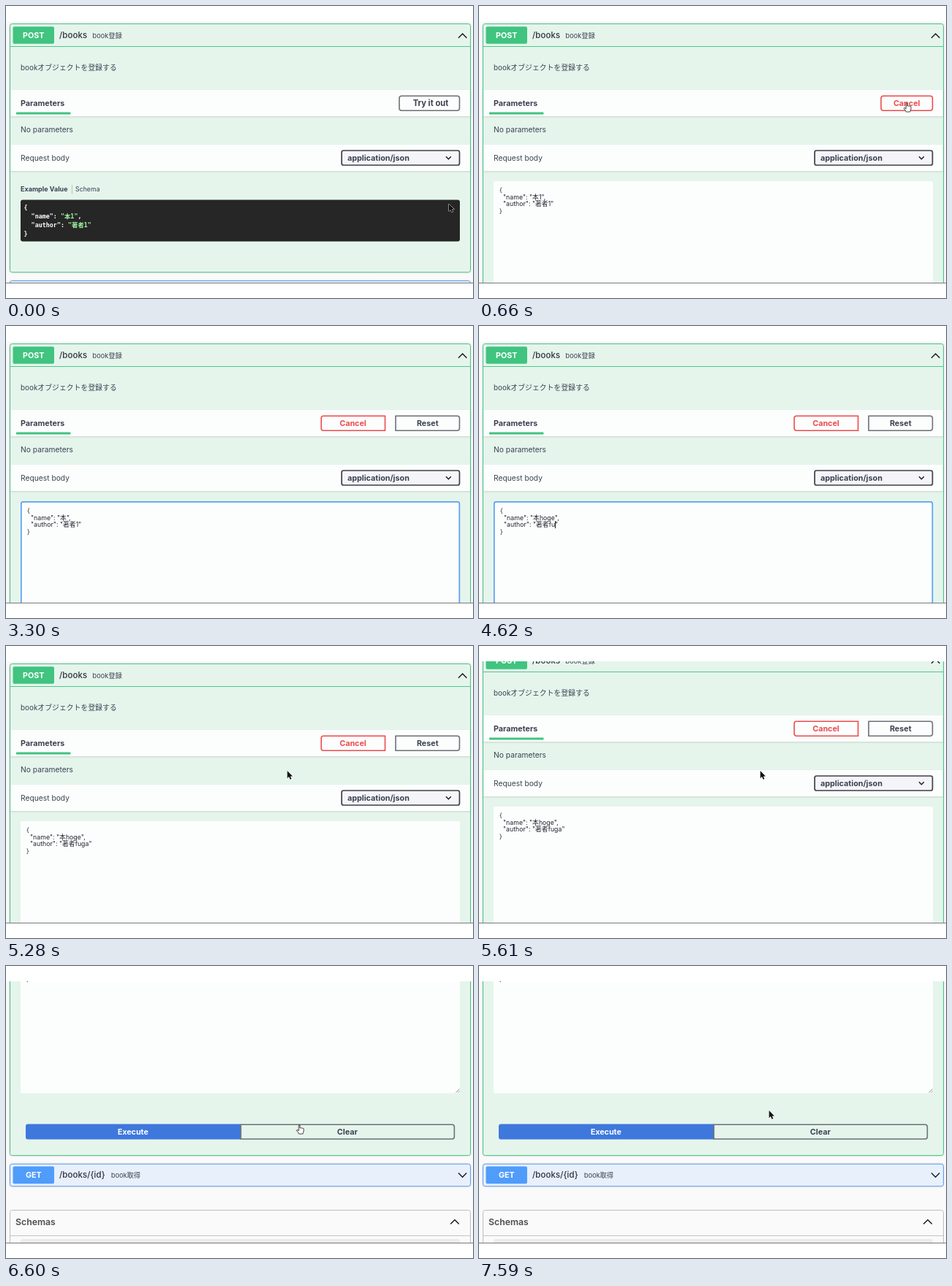
An HTML page that plays this animation: 640 by 400 pixels, repeating every 7.92 s.

```html
<!DOCTYPE html>
<html lang="ja">
<head>
<meta charset="utf-8">
<title>POST /books</title>
<style>
  html, body { margin: 0; width: 100%; height: 100%; overflow: hidden; background: #fff; }
  svg { display: block; width: 640px; height: 400px; }
  text { font: 10.25px Inter, "Noto Sans CJK JP", sans-serif; fill: #3b4151; white-space: pre; }
  .b { font-weight: 700; font-size: 10.75px; }
  .mid { text-anchor: middle; }
  .white { fill: #fff; }
  .path { font-size: 11.6px; font-weight: 500; fill: #30343f; }
  .note { font-size: 9.25px; }
  .code { font: 700 8.4px "DejaVu Sans Mono", "Noto Sans CJK JP", monospace; fill: #fff; }
  .code .str { fill: #a2f5a2; }
  #editor text { font-size: 8.8px; fill: #222630; }
  .row { fill: #fcfefd; filter: drop-shadow(0 1px 1px rgba(0,0,0,.13)); }
  .btn { fill: none; stroke: #6c6f75; stroke-width: 1.6; }
  .red { stroke: #ee4a4e; }
  text.red { stroke: none; fill: #ee4a4e; }
  .chev { fill: none; stroke: #16181c; stroke-width: 1.4; }
  .box { filter: drop-shadow(0 0 1.2px rgba(0,0,0,.2)); }
  .halo { stroke: #fff; stroke-width: .9; stroke-linejoin: round; paint-order: stroke; }
</style>
</head>
<body>
<svg viewBox="0 0 640 400">
  <clipPath id="view"><rect y="21" width="640" height="359"/></clipPath>
  <rect width="640" height="400" fill="#fff"/>
  <g clip-path="url(#view)">
    <rect y="21" width="640" height="359" fill="#fafafa"/>
    <g id="page">
      <rect id="panel" class="box" x="5.5" y="24.5" width="631" rx="3" fill="#e5f5ec" stroke="#4cc68a"/>
      <path d="M6 55.5H636" stroke="#4cc68a"/>
      <rect x="9.5" y="28.3" width="56.5" height="23.5" rx="2" fill="#40c47f"/>
      <text class="b mid white" x="37.8" y="43.9">POST</text>
      <text class="path" x="73" y="44.4">/books</text>
      <text class="note" x="118.6" y="43.6">book登録</text>
      <path class="chev" d="M620 43.8l5.7-5.8 5.7 5.8"/>
      <text x="20" y="87.6" style="font-size:9.9px">bookオブジェクトを登録する</text>

      <rect class="row" x="6" y="115" width="630" height="36"/>
      <text class="b" x="20" y="136.8">Parameters</text>
      <path d="M14 147H88.5" stroke="#40c47f" stroke-width="2.8"/>
      <text x="20" y="172.6">No parameters</text>

      <rect class="row" x="6" y="190" width="630" height="36"/>
      <text x="20" y="211.8">Request body</text>
      <rect x="460" y="198" width="161.5" height="20" rx="2.5" fill="#f5f4f9" stroke="#3d4048" stroke-width="1.7"/>
      <text class="b" x="468" y="211.9">application/json</text>
      <path class="chev" d="M603 206.3l3.4 3.4 3.4-3.4"/>

      <g id="example">
        <path class="btn" data-box="539 123.3 82.5 20 3 3"/>
        <text class="b mid" x="582" y="137" style="font-size:11.2px">Try it out</text>
        <text class="b" x="20" y="254.4" style="font-size:9px">Example Value</text>
        <path d="M90.5 245V257.5" stroke="#b9c4c0"/>
        <text x="95" y="254.4" style="font-size:8.8px">Schema</text>
        <rect x="20" y="265.5" width="602" height="57" rx="3" fill="#262626"/>
        <text class="code" x="24.5" y="279">{</text>
        <text class="code" x="24.5" y="291">  "name": <tspan class="str">"本1"</tspan>,</text>
        <text class="code" x="24.5" y="303">  "author": <tspan class="str">"著者1"</tspan></text>
        <text class="code" x="24.5" y="315">}</text>
      </g>

      <g id="form">
        <g id="single">
          <path class="btn red" data-box="551 123.3 70.5 20 3 3"/>
          <text class="b mid red" x="586.2" y="137">Cancel</text>
        </g>
        <g id="pair">
          <path class="btn red" data-box="432 123.3 87.5 20 3 0"/>
          <text class="b mid red" x="475.5" y="137">Cancel</text>
          <path class="btn" data-box="534 123.3 87.5 20 0 3"/>
          <text class="b mid" x="577.8" y="137">Reset</text>
        </g>
        <rect x="20" y="240" width="602" height="197.3" rx="2" fill="#fcfefd"/>
        <rect id="ring" x="20.8" y="240.8" width="600.6" height="195.7" rx="2.5" fill="none" stroke="#5a9ff2" stroke-width="1.7"/>
        <path d="M616.5 436.5l5-5M619.5 436.5l2-2" stroke="#777" stroke-width=".8"/>
        <g id="editor">
          <text x="29" y="256"></text>
          <text x="29" y="265.6"></text>
          <text x="29" y="275.2"></text>
          <text x="29" y="284.8"></text>
          <rect id="caret" width="1" height="10" fill="#111"/>
        </g>
        <g id="run">
          <rect x="20" y="472" width="602" height="26" rx="2.5" fill="#3e78dc"/>
          <text class="b mid white" x="320.8" y="488.9">Execute</text>
        </g>
        <g id="done">
          <path data-box="27 479.5 294.5 21 3 0" fill="#3e78dc"/>
          <text class="b mid white" x="174" y="494">Execute</text>
          <path class="btn" data-box="321.8 480.2 292.6 19.8 0 3"/>
          <text class="b mid" x="467.8" y="494">Clear</text>
        </g>
      </g>

      <g id="below">
        <rect class="box" x="5.5" y="524.3" width="631" height="30.4" rx="3" fill="#e8f0fb" stroke="#5c9ff5"/>
        <rect x="9.5" y="527.5" width="56.5" height="23.7" rx="2" fill="#509cfb"/>
        <text class="b mid white" x="37.8" y="543.2">GET</text>
        <text class="path" x="73" y="543.4">/books/{id}</text>
        <text class="note" x="144" y="542.8">book取得</text>
        <path class="chev" d="M620 536.6l5.6 5.6 5.6-5.6"/>
        <rect x="5.5" y="587.5" width="631" height="90" rx="3" fill="#fafafa" stroke="#bdbdbd"/>
        <path d="M6 622.5H636" stroke="#c4c4c4"/>
        <text x="13" y="607.6" style="font-size:12.3px;font-weight:600;fill:#4c4d51">Schemas</text>
        <path class="chev" d="M609.2 606.6l5.8-5.8 5.8 5.8"/>
        <rect x="20" y="627" width="602" height="40" rx="3" fill="#ebebeb"/>
      </g>
    </g>
  </g>
  <path d="M0 379.5H640" stroke="#77797b"/>
  <g id="pointer">
    <path id="arrow" class="halo" d="M0 0V10.2L2.3 8.1 3.9 11.7 5.7 10.9 4.1 7.4H7.3Z" fill="#111"/>
    <path id="hand" d="M-.8 .2q.9-1 1.7 0V4q1-.8 1.8 .1 1.1-.6 1.8 .3 1.2-.4 1.5 .6V8q-.3 1.8-1.3 4H-.5Q-2 9.5-3.8 7.200q.3-1.200 1.600-.5L-.8 7.800Z" fill="#fff" stroke="#111" stroke-width=".8"/>
    <g id="beam" fill="none">
      <path d="M-2.800-5.500Q0-5.500 0-4 0-5.500 2.800-5.500M0-4V4M-2.800 5.500Q0 5.500 0 4 0 5.500 2.800 5.500M-1.500 2H1.500" stroke="#111" stroke-width="1.100"/>
    </g>
  </g>
</svg>
<script>
const STEP = 330, STEPS = 24;
const $ = id => document.getElementById(id);
const show = (id, on) => $(id).setAttribute('display', on ? 'inline' : 'none');
const move = (id, x, y) => $(id).setAttribute('transform', `translate(${x} ${y})`);
const lines = [...document.querySelectorAll('#editor text')];

// Box outline with separate left and right corner radii
const box = (x, y, w, h, l, r) =>
  `M${x + l} ${y}H${x + w - r}a${r} ${r} 0 0 1 ${r} ${r}V${y + h - r}a${r} ${r} 0 0 1 ${-r} ${r}` +
  `H${x + l}a${l} ${l} 0 0 1 ${-l} ${-l}V${y + l}a${l} ${l} 0 0 1 ${l} ${-l}Z`;
document.querySelectorAll('[data-box]').forEach(p =>
  p.setAttribute('d', box(...p.dataset.box.split(' ').map(Number))));

// Each cue changes the state from its step onward; caret is [line, column]
const start = { open: false, done: false, dirty: false, focus: false, scroll: 0,
  name: '本1', author: '著者1', caret: null, cursor: 'arrow', at: [607, 271] };
const cues = {
  1: { cursor: 'hand', at: [586, 133] },
  2: { open: true },
  3: { cursor: 'beam', at: [317, 286.5] },
  4: { focus: true, caret: [3, 1] },
  6: { cursor: '', caret: [1, 1] },
  7: { caret: [1, 4] },
  8: { caret: [1, 9] },
  9: { caret: [1, 13] },
  10: { name: '本', dirty: true, caret: null },
  11: { name: '本hoge', caret: [2, 17] },
  12: { caret: [2, 16] },
  13: { author: '著者', caret: [2, 15] },
  14: { author: '著者fu', caret: [2, 17] },
  15: { author: '著者fuga', caret: [2, 19] },
  16: { focus: false, caret: null, cursor: 'arrow', at: [385.5, 171] },
  17: { scroll: 20 },
  18: { scroll: 263, at: [404.5, 196.5] },
  19: { cursor: 'hand', at: [402, 218] },
  20: { done: true },
  21: { cursor: 'arrow', at: [399, 203] },
  22: { at: [397.5, 198] }
};

function stateAt(step) {
  const s = { ...start };
  for (let i = 1; i <= step; i++) Object.assign(s, cues[i]);
  return s;
}

function placeCaret(caret) {
  show('caret', caret);
  if (!caret) return;
  const [row, col] = caret, line = lines[row];
  $('caret').setAttribute('x', 29 + line.getSubStringLength(0, col));
  $('caret').setAttribute('y', line.getAttribute('y') - 8);
}

function draw(step) {
  const s = stateAt(step);
  const shift = s.open ? (s.done ? 10 : 0) : -147.8;
  move('page', 0, -s.scroll);
  move('below', 0, shift);
  $('panel').setAttribute('height', 488 + shift);
  show('example', !s.open);
  show('form', s.open);
  show('single', !s.dirty);
  show('pair', s.dirty);
  show('ring', s.focus);
  show('run', !s.done);
  show('done', s.done);

  const inset = s.focus ? 0 : -1;
  move('editor', inset, inset);
  ['{', `  "name": "${s.name}",`, `  "author": "${s.author}"`, '}']
    .forEach((str, i) => lines[i].textContent = str);
  placeCaret(s.open && s.caret);

  ['arrow', 'hand', 'beam'].forEach(c => show(c, c === s.cursor));
  move('pointer', ...s.at);
}

const t0 = performance.now();
let last = -1;
function tick() {
  const step = Math.floor((performance.now() - t0) / STEP) % STEPS;
  if (step !== last) draw(last = step);
  requestAnimationFrame(tick);
}
tick();
</script>
</body>
</html>
```
